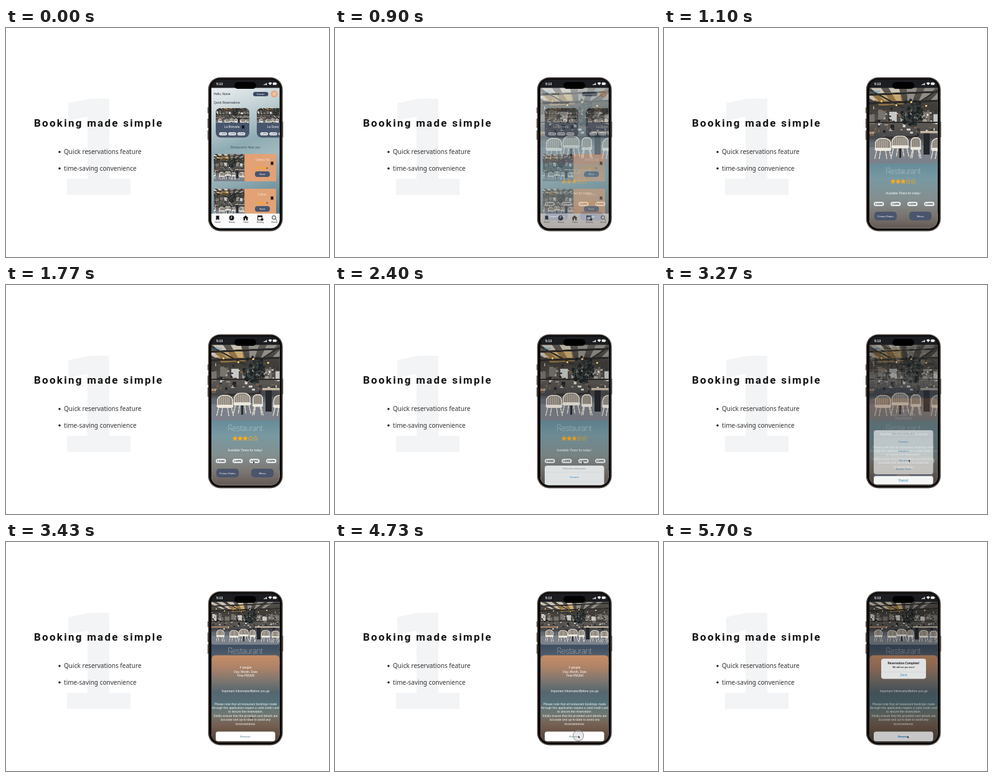
Animation of 519x369 px, one loop 5730 ms. Source, as an HTML page with a canvas:

```html
<!DOCTYPE html>
<html lang="en">
<head>
<meta charset="utf-8">
<title>Booking made simple</title>
<style>
  html, body { margin: 0; width: 100%; height: 100%; overflow: hidden; background: #fff; }
  canvas { display: block; width: 519px; height: 369px; }
</style>
</head>
<body>
<canvas id="stage"></canvas>
<script>
const W = 519, H = 369, LOOP = 5730;
const SANS = '"Liberation Sans", Arial, sans-serif';
const SLATE = '#48566d', ORANGE = '#e2a276', BLUE = '#2f86c5';
const canvas = document.getElementById('stage');
const dpr = window.devicePixelRatio || 1;
canvas.width = W * dpr;
canvas.height = H * dpr;
const ctx = canvas.getContext('2d');
ctx.scale(dpr, dpr);

const clamp = v => Math.max(0, Math.min(1, v));
const span = (t, a, b) => clamp((t - a) / (b - a));
const ease = p => p * p * (3 - 2 * p);

function rect(x, y, w, h, color, c = ctx) {
  c.fillStyle = color;
  c.fillRect(x, y, w, h);
}

function round(x, y, w, h, r, color, c = ctx) {
  c.beginPath();
  c.roundRect(x, y, w, h, r);
  c.fillStyle = color;
  c.fill();
}

function disc(x, y, r, color, c = ctx) {
  c.beginPath();
  c.arc(x, y, r, 0, 7);
  c.fillStyle = color;
  c.fill();
}

function poly(points, color, c = ctx) {
  c.beginPath();
  points.forEach(([x, y]) => c.lineTo(x, y));
  c.closePath();
  c.fillStyle = color;
  c.fill();
}

function line(points, color, width, c = ctx) {
  c.beginPath();
  points.forEach(([x, y]) => c.lineTo(x, y));
  c.strokeStyle = color;
  c.lineWidth = width;
  c.stroke();
}

function text(str, x, y, size, color, { align = 'center', weight = 400, family = SANS, gap = 0 } = {}) {
  ctx.font = `${weight} ${size}px ${family}`;
  ctx.letterSpacing = gap + 'px';
  ctx.textAlign = align;
  ctx.fillStyle = color;
  ctx.fillText(str, x, y);
}

function gradient(x0, y0, x1, y1, stops, c = ctx) {
  const g = c.createLinearGradient(x0, y0, x1, y1);
  stops.forEach(([p, color]) => g.addColorStop(p, color));
  return g;
}

function star(x, y, r, filled) {
  ctx.beginPath();
  for (let i = 0; i < 10; i++) {
    const a = -Math.PI / 2 + i * Math.PI / 5, d = i % 2 ? r * 0.48 : r;
    ctx.lineTo(x + d * Math.cos(a), y + d * Math.sin(a));
  }
  ctx.closePath();
  ctx.fillStyle = ctx.strokeStyle = '#fbaa1c';
  ctx.lineWidth = 0.7;
  if (filled) ctx.fill();
  ctx.stroke();
}

function bookmark(x, y, w = 4, h = 6) {
  poly([[x, y], [x + w, y], [x + w, y + h], [x + w / 2, y + h * 0.7], [x, y + h]], '#11151b');
}

// Dining room, 160 x 100 units
function armchair(c, x, y, w) {
  const mid = x + w / 2, cream = '#ddd6ca';
  [[x + 3, x], [x + w - 3, x + w], [mid - 3, mid - 5], [mid + 3, mid + 5]]
    .forEach(([a, b]) => line([[a, y + 14], [b, y + 27]], cream, 1.2, c));
  round(x + 1, y, w - 2, 15, [w / 3, w / 3, 3, 3], '#8f8980', c);
  c.strokeStyle = cream;
  c.lineWidth = 1.4;
  c.stroke();
  for (let k = x + 4; k < x + w - 3; k += 2.5) line([[k, y + 2], [k, y + 13]], '#bdb5a8', 0.6, c);
  round(x, y + 12, w, 4, 2, '#ece7dd', c);
}

function makeRoom() {
  const room = document.createElement('canvas');
  room.width = 640;
  room.height = 400;
  const c = room.getContext('2d');
  c.scale(4, 4);
  let seed = 11;
  const rnd = () => (seed = seed * 16807 % 2147483647) / 2147483647;
  const pick = list => list[Math.floor(rnd() * list.length)];

  rect(0, 0, 160, 100, gradient(0, 0, 0, 100,
    [[0, '#5e5a55'], [0.25, '#3f3c39'], [0.5, '#5a5753'], [0.66, '#45464a'], [0.72, '#646a73'], [1, '#757b84']], c), c);

  // Ceiling: skylights, beams and a warm glow
  for (let i = 0; i < 7; i++) {
    poly([[i * 24 - 12, 0], [i * 24 + 2, 0], [i * 15 + 32, 17], [i * 15 + 25, 17]], i < 4 ? '#c9c1b3' : '#918d87', c);
  }
  poly([[38, 8], [76, 6], [80, 22], [48, 24]], 'rgba(200,150,70,.55)', c);
  line([[0, 11], [160, 4]], '#2b2a2a', 2.4, c);
  line([[0, 22], [160, 16]], '#2b2a2a', 2.6, c);
  line([[30, 0], [82, 28]], '#33302d', 2, c);
  line([[130, 0], [90, 26]], '#33302d', 2, c);

  // Shelves and bar
  for (let i = 0; i < 11; i++) rect(3 + i * 14.5, 29 + (i % 3) * 3, 10, 13, i % 4 ? '#77736d' : '#c6c8c6', c);
  for (let i = 0; i < 190; i++) {
    rect(rnd() * 160, 24 + rnd() * 38, 1 + rnd() * 4, 1 + rnd() * 3,
      pick(['#222326', '#3a3836', '#75614b', '#a6a19a', '#55514d', '#d0cec8']), c);
  }
  rect(0, 45, 160, 1.6, '#2c2b2c', c);
  for (let i = 0; i < 140; i++) {
    const a = rnd() * 7, d = Math.sqrt(rnd());
    disc(91 + Math.cos(a) * d * 14, 33 + Math.sin(a) * d * 19, 0.8 + rnd() * 1.8,
      pick(['#1c2224', '#293031', '#3b4241', '#222426']), c);
  }
  for (let i = 0; i < 8; i++) disc(12 + i * 19.5, 17 + (i * 5) % 9, 1.4, '#f0c877', c);

  // Floor, tables and chairs
  poly([[0, 80], [160, 74], [160, 100], [0, 100]], '#7b818a', c);
  rect(0, 58, 40, 3, '#b08661', c);
  rect(102, 57, 58, 3, '#c9bba6', c);
  rect(106, 60, 8, 28, '#25272b', c);
  rect(142, 60, 6, 26, '#2d2f33', c);
  poly([[52, 65], [98, 63], [98, 66], [52, 68]], '#34312f', c);
  rect(74, 66, 3, 26, '#28292c', c);
  [[12, 66, 19], [42, 67, 22], [64, 64, 23], [89, 66, 14], [116, 67, 21], [140, 68, 18]]
    .forEach(([x, y, w]) => armchair(c, x, y, w));
  return room;
}
const room = makeRoom();

function photo(x, y, w, h, radii = 0) {
  const k = Math.max(w / 160, h / 100), sw = w / k, sh = h / k;
  ctx.save();
  ctx.beginPath();
  ctx.roundRect(x, y, w, h, radii);
  ctx.clip();
  ctx.drawImage(room, (160 - sw) * 2, (100 - sh) * 2, sw * 4, sh * 4, x, y, w, h);
  ctx.restore();
}

function venueCard(x, name) {
  round(x, 129, 54, 47.5, 8, SLATE);
  photo(x, 129, 54, 24, [8, 8, 0, 0]);
  text(name, x + 26, 161, 4.9, '#fff');
  bookmark(x + 42, 157);
  ['1:00PM', '3:45PM', '8:00PM'].forEach((s, i) => {
    round(x + 5.5 + i * 14.7, 168, 12.5, 5, 2.5, '#eef1f3');
    text(s, x + 11.7 + i * 14.7, 171.5, 2.7, '#39424f');
  });
}

function venueRow(y, name) {
  rect(334, y, 100, 44, ORANGE);
  photo(334, y, 49, 44);
  rect(383, y, 1, 44, '#c88f68');
  text(name, 412, y + 10.5, 4.7, '#fbe9dc');
  bookmark(425.5, y + 12.5);
  for (let i = 0; i < 5; i++) star(404.5 + i * 3.1, y + 22.7, 1.3, i < 3);
  disc(419.5, y + 22.7, 1.5, '#8d6a53');
  round(400, y + 28, 24, 9, 4, SLATE);
  text('Book', 412, y + 34, 3.9, '#fff');
}

function tabBar() {
  const ink = '#14171c';
  rect(330, 299, 110, 24, '#fbfbfb');
  bookmark(337.5, 302.5, 5, 7.5);
  disc(362.5, 306, 4, ink);
  line([[362.5, 303.2], [362.5, 306.3], [360.4, 306.3]], '#fff', 0.8);
  poly([[380.5, 306], [385, 302], [389.5, 306], [388.4, 306], [388.4, 310], [381.6, 310], [381.6, 306]], ink);
  rect(384, 307, 2, 3, '#fff');
  ctx.strokeStyle = ink;
  ctx.lineWidth = 1;
  ctx.strokeRect(404.5, 302.8, 7, 6.5);
  rect(404, 302.3, 8, 2.4, ink);
  disc(411.5, 308.6, 2.1, ink);
  ctx.beginPath();
  ctx.arc(430.5, 305.4, 2.9, 0, 7);
  ctx.stroke();
  line([[432.6, 307.5], [435.2, 310.1]], ink, 1);
  ['Saved', 'History', 'Home', 'Booking', 'Search'].forEach((s, i) => text(s, 340 + i * 22.8, 314, 3.2, '#30343a'));
}

function homeScreen() {
  rect(330, 96, 110, 227, gradient(340, 96, 415, 300,
    [[0, '#e9edef'], [0.22, '#c3d1d5'], [0.45, '#8eabb3'], [0.6, '#a3b9bf'], [1, '#587f8b']]));
  text('Hello, Name', 334, 108, 4.8, '#222a33', { align: 'left' });
  round(397, 103, 24.5, 7, 3.5, '#394862');
  text('Guests', 409, 107.9, 3.9, '#fff');
  disc(431, 106.3, 5.5, '#e5a77c');
  disc(431, 106.3, 3, '#f0c5a3');
  text('Quick Reservations', 334, 121.5, 4.85, '#222a33', { align: 'left' });
  venueCard(337, 'La Brinvela');
  venueCard(403, 'Le Duno');
  text('Restaurants Near you', 384.5, 193.8, 4.9, '#3e5561');
  venueRow(203, 'Osteva Tal');
  venueRow(259, 'Il Noru');
  tabBar();
}

function title(y) {
  text('Restaurant', 384, y, 12.8, '#eef3f5', { weight: 100, family: 'Inter, sans-serif', gap: -0.45 });
}

function detailScreen() {
  rect(330, 96, 110, 227, gradient(0, 216, 0, 323,
    [[0, '#648b99'], [0.25, '#7899a2'], [0.55, '#838f8f'], [0.8, '#7a7571'], [1, '#645953']]));
  photo(330, 96, 110, 122.5, [0, 0, 5, 5]);
  text('‹ Back', 333, 103.5, 4.9, '#3a8fd0', { align: 'left' });
  title(234.5);
  for (let i = 0; i < 5; i++) star(368 + i * 8.2, 247.4, 3.9, i < 3);
  text('Available Times for today!', 384, 267.6, 4.87, '#fff');
  ['9:45AM', '1:00PM', '3:45PM', '8:00PM'].forEach((s, i) => {
    const x = 345 + i * 27;
    round(x - 8, 280, 16.5, 7, 3.5, '#e9edee');
    text(s, x, 284.8, 3.4, '#323a43', { weight: 700 });
  });
  [['Future Dates', 356], ['Menu', 412]].forEach(([s, x]) => {
    round(x - 18, 296, 36, 14, 5, '#4a556d');
    text(s, x, 304.6, 4.4, '#fff');
  });
}

function seatingSheet(offset) {
  ctx.save();
  ctx.translate(0, offset);
  round(337, 234, 95.5, 71, 4, '#dfe2e3');
  text('Select your seating option', 384.5, 240.5, 3.2, '#7e8488');
  ['Counter', 'Standard', 'Terrace', 'Smoke Free'].forEach((s, i) => {
    const y = 254 + i * 14.8;
    rect(337, y - 9.3, 95.5, 0.4, '#c9cdcf');
    text(s, 384.5, y, 4.4, BLUE);
  });
  round(337, 308, 95.5, 13.5, 4, '#f1f2f2');
  text('Cancel', 384.5, 316.5, 4.5, BLUE, { weight: 700 });
  ctx.restore();
}

function confirmScreen() {
  rect(330, 96, 110, 227, gradient(0, 160, 0, 190, [[0, '#36475c'], [1, '#58636f']]));
  photo(330, 96, 110, 69.5, [0, 0, 4, 4]);
  title(180);
  round(330.5, 182.5, 109, 141, [6, 6, 0, 0], gradient(0, 183, 0, 323, [
    [0, '#c68d65'], [0.14, '#ad8268'], [0.3, '#797570'], [0.42, '#56666f'],
    [0.55, '#547078'], [0.67, '#6f7771'], [0.8, '#765f50'], [1, '#4e4038']]));
  ['# people', 'Day, Month, Date', 'Time PM|AM'].forEach((s, i) => text(s, 385, 204 + i * 6.5, 4.9, '#fff'));
  text('Important InformationBefore you go', 385, 242, 4.9, '#fff');
  [
    'Please note that all restaurant bookings made',
    'through this application require a valid credit card',
    'to secure the reservation.',
    'Kindly ensure that the provided card details are',
    'accurate and up-to-date to avoid any',
    'inconvenience.'
  ].forEach((s, i) => text(s, 385, 262.5 + i * 6.4, 4.95, '#f4f4f2'));
  round(337, 305.5, 95.5, 15.5, 4, '#fff');
  text('Reserve', 384.5, 315, 4.4, '#376474');
}

function alertBox() {
  shade(0.22);
  round(349, 188, 72, 32.5, 4, '#e1e2e2');
  text('Reservation Complete!', 385, 197.4, 4.7, '#16191c', { weight: 700 });
  text('We will see you soon!', 385, 203.2, 3.4, '#24282b', { weight: 700 });
  rect(349, 209.5, 72, 0.4, '#bfc3c5');
  text('Done', 385, 216, 4.5, BLUE);
  text('Reserve', 384.5, 315, 4.4, BLUE, { weight: 700 });
}

const shade = alpha => rect(330, 96, 110, 227, `rgba(0,0,0,${alpha})`);

// Pointer path: time, x, y
const path = [
  [30, 417, 104], [580, 364, 146], [1230, 364, 146], [1780, 397, 284],
  [2670, 397, 284], [3200, 393, 281], [3870, 393, 282], [4270, 391, 312]
];
const taps = [640, 1880, 3130, 4730];

function pointerAt(t) {
  const next = path.findIndex(([time]) => time > t);
  if (next === 0) return path[0].slice(1);
  if (next < 0) return path[path.length - 1].slice(1);
  const [a, x0, y0] = path[next - 1], [b, x1, y1] = path[next];
  const p = ease(span(t, a, b));
  return [x0 + (x1 - x0) * p, y0 + (y1 - y0) * p];
}

function pointer(t) {
  const [x, y] = pointerAt(t);
  if (taps.some(tap => t >= tap && t < tap + 140)) {
    disc(x, y, 8.5, 'rgba(150,155,158,.22)');
    ctx.strokeStyle = '#85898b';
    ctx.lineWidth = 1;
    ctx.stroke();
  }
  ctx.save();
  ctx.translate(x, y);
  poly([[0, 0], [0, 4], [0.9, 3.2], [1.6, 4.7], [2.3, 4.4], [1.6, 3], [2.8, 2.9]], '#111');
  ctx.strokeStyle = 'rgba(255,255,255,.6)';
  ctx.lineWidth = 0.3;
  ctx.stroke();
  ctx.restore();
}

function backdrop() {
  rect(0, 0, W, H, '#fff');
  poly([[100, 121], [134, 114], [166, 114], [166, 243], [200, 243], [200, 269],
    [98, 269], [98, 243], [131, 243], [131, 143], [100, 149]], '#f2f4f6');
  text('Booking made simple', 45, 159, 17, '#111', { align: 'left', weight: 700, family: 'Roboto, sans-serif', gap: 2.25 });
  ['Quick reservations feature', 'time-saving convenience'].forEach((s, i) => {
    const y = 203.4 + i * 26.4;
    disc(86, y - 3.6, 1.7, '#222');
    text(s, 93, y, 10.05, '#333', { align: 'left', family: '"Noto Sans", sans-serif' });
  });
}

function phoneBody() {
  [[128, 9], [146, 15], [165, 15]].forEach(([y, h]) => rect(324, y, 2, h, '#3a3430'));
  rect(443.6, 151, 1.6, 25, '#3a3430');
  round(324.8, 79.4, 119.8, 248, 19.5, '#3b342f');
  round(325.4, 80, 118.6, 246.8, 19, '#7a6f67');
  round(326, 80.6, 117.4, 245.6, 18.5, '#0d0b0a');
}

function statusBar() {
  rect(330, 83, 110, 13.5, '#1b1d21');
  round(367, 87, 35, 11, 5.5, '#000');
  text('5:13', 338, 92.4, 5.2, '#fff', { align: 'left', weight: 700 });
  for (let i = 0; i < 4; i++) rect(414 + i * 1.4, 91 - i * 0.8, 1, 1 + i * 0.8, '#fff');
  ctx.beginPath();
  ctx.moveTo(424.5, 92);
  ctx.arc(424.5, 92, 4.2, -2.35, -0.79);
  ctx.closePath();
  ctx.fillStyle = '#fff';
  ctx.fill();
  round(428.7, 87.7, 6, 4, 1.3, '#f2f2f2');
  rect(435, 89, 0.6, 1.4, '#aaa');
}

// Draws a whole screen on its own layer, so that it dissolves evenly
const layer = document.createElement('canvas');
layer.width = canvas.width;
layer.height = canvas.height;
const under = layer.getContext('2d');

function dissolve(p, draw) {
  if (p <= 0) return;
  if (p < 1) {
    under.globalAlpha = 1;
    under.drawImage(canvas, 0, 0);
  }
  draw();
  if (p < 1) {
    ctx.globalAlpha = 1 - p;
    ctx.drawImage(layer, 0, 0, W, H);
    ctx.globalAlpha = 1;
  }
}

function screen(t) {
  const sheet = ease(span(t, 2313, 2530));
  homeScreen();
  dissolve(ease(span(t, 750, 1050)), detailScreen);
  if (sheet > 0) {
    shade(0.25 * sheet);
    seatingSheet(88 * (1 - sheet));
  }
  dissolve(span(t, 3235, 3380), confirmScreen);
  dissolve(ease(span(t, 4830, 5130)), alertBox);
  pointer(t);
}

function frame(t) {
  backdrop();
  phoneBody();
  ctx.save();
  ctx.beginPath();
  ctx.roundRect(330, 83, 109.6, 239.5, 14);
  ctx.clip();
  screen(t);
  statusBar();
  ctx.restore();
}

let origin = null;
function tick(now) {
  origin ??= now;
  frame((now - origin) % LOOP);
  requestAnimationFrame(tick);
}
requestAnimationFrame(tick);
</script>
</body>
</html>
```
